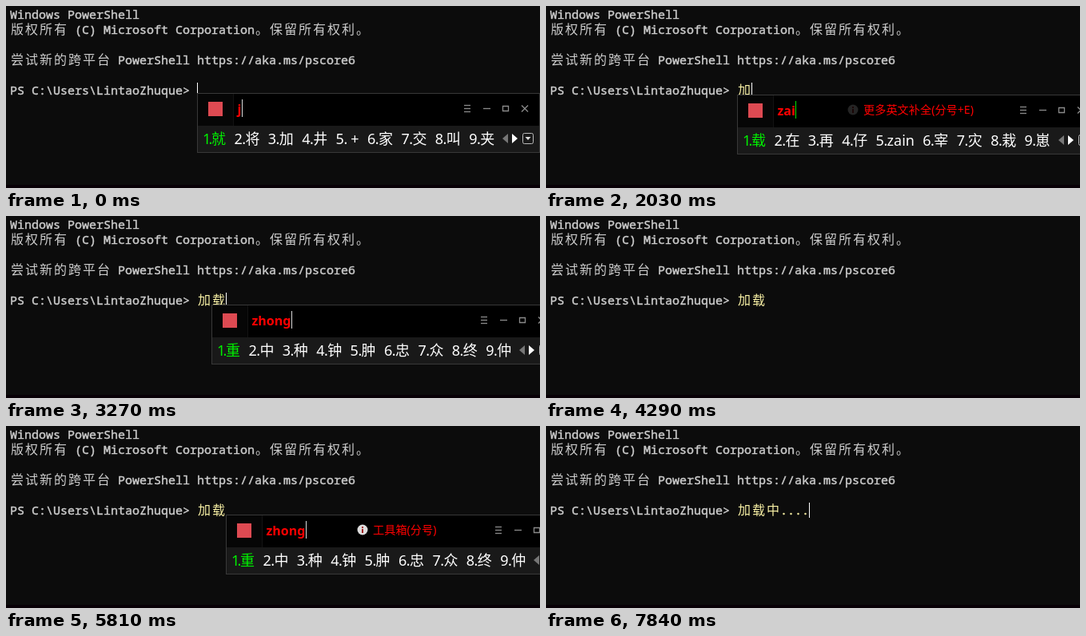
These frames come from a looping animation (668 px wide and 228 px high, 8 s). An HTML page:

```html
<!DOCTYPE html>
<html lang="zh-CN">
<head>
<meta charset="utf-8">
<title>Terminal input</title>
<style>
  html, body { margin: 0; width: 100%; height: 100%; overflow: hidden; background: #0c0c0c; }
  svg { display: block; width: 668px; height: 228px; }
  text { white-space: pre; }
  .mono { font: 15px "Noto Sans Mono", "DejaVu Sans Mono", monospace; stroke-width: 0.45px; }
  .wide { font: 16px "Noto Sans CJK SC", "Noto Sans CJK", sans-serif; letter-spacing: 2px; stroke-width: 0; }
  .out { fill: #ccc; stroke: #ccc; }
  .in { fill: #f9f1a5; stroke: #f9f1a5; }
  .item { font: 18px "Noto Sans", "Noto Sans CJK SC", "Noto Sans CJK", sans-serif; fill: #fff; }
  .pick { fill: #00f000; }
  .keys { font: bold 16px "Noto Sans", sans-serif; fill: #f00; }
  .hint { font: 14.2px "Noto Sans", "Noto Sans CJK SC", "Noto Sans CJK", sans-serif; fill: #f00; }
</style>
</head>
<body>
<svg id="stage" viewBox="0 0 668 228">
  <rect width="668" height="228" fill="#0c0c0c"/>
  <rect y="224" width="668" height="4" fill="#080006"/>
  <g id="screen"></g>
  <g id="live"></g>
</svg>
<script>
const LOOP = 8000, CELL = 9, PROMPT_X = 239;
const screenLayer = document.getElementById('screen');
const live = document.getElementById('live');

function add(parent, tag, attrs, content) {
  const el = document.createElementNS('http://www.w3.org/2000/svg', tag);
  for (const key in attrs) el.setAttribute(key, attrs[key]);
  if (content !== undefined) el.textContent = content;
  parent.appendChild(el);
  return el;
}

const rect = (g, x, y, width, height, fill) => add(g, 'rect', { x, y, width, height, fill });
const line = (g, d, stroke) => add(g, 'path', { d, stroke, fill: 'none', 'stroke-width': 1.3 });
const shape = (g, d, fill) => add(g, 'path', { d, fill });

// Lays text on the terminal grid (Chinese takes two cells); returns the end x.
function cells(g, text, x, y, cls) {
  for (const run of text.match(/[\u3000-\u9fff]+|[^\u3000-\u9fff]+/g) || []) {
    const wide = run.charCodeAt(0) >= 0x3000;
    add(g, 'text', { x: x + (wide ? 1 : 0), y, class: (wide ? 'wide ' : 'mono ') + cls }, run);
    x += run.length * CELL * (wide ? 2 : 1);
  }
  return x;
}

const words = {
  j: '就 将 加 井 + 家 交 叫 夹',
  ji: '几 及 级 记 机 即 急 极 击',
  jia: '加 家 价 假 架 甲 佳 夹 嫁',
  z: '在 中 这 再 怎么 总 最 做 着',
  za: '咋 杂 砸 在 再 扎 匝 咱 脏',
  zai: '载 在 再 仔 zain 宰 灾 栽 崽',
  zh: '中 之后 这 张 纸 账户 找 账号 着',
  zho: '中 周 重 种 州 粥 洲 轴 皱',
  zhon: '中 重 种 钟 肿 忠 众 终 仲',
  zhong: '重 中 种 钟 肿 忠 众 终 仲'
};

function candidates(g, keys, x, y) {
  let end = x;
  words[keys].split(' ').forEach((word, i) => {
    const cls = i ? 'item' : 'item pick';
    add(g, 'text', { x: i ? x : x - 1, y, class: cls, 'letter-spacing': i ? -0.5 : -2.8 }, i + 1 + '.');
    const wordX = x + (i ? 14 : 10);
    const label = add(g, 'text', { x: wordX, y, class: cls }, word === '+' ? ' +' : word);
    end = wordX + label.getComputedTextLength();
    x = end + 10.4;
  });
  return end;
}

function windowIcons(g, right, y) {
  const m = Math.round(right - 91), c = y + 19.5, gray = '#8a8a8a';
  for (const dy of [-4, 0, 4]) line(g, `M${m - 4} ${c + dy}h8`, gray);
  line(g, `M${m + 20} ${c}h9`, gray);
  line(g, `M${m + 44.5} ${c - 3}h7v6h-7z`, gray);
  line(g, `M${m + 68} ${c - 4}l8 8m0 -8l-8 8`, gray);
}

function pager(g, end, y) {
  const x = Math.round(end), c = y + 57;
  shape(g, `M${x + 17} ${c - 6}v12l-7 -6z`, '#777');
  shape(g, `M${x + 22} ${c - 6}v12l7 -6z`, '#fff');
  add(g, 'rect', { x: x + 35.5, y: c - 6.5, width: 13, height: 13, rx: 2, fill: 'none', stroke: '#bbb' });
  shape(g, `M${x + 38.5} ${c - 2}h7l-3.5 4z`, '#ddd');
}

function hintLabel(g, { x, text, glow }, y) {
  const icon = add(g, 'g', { opacity: glow });
  add(icon, 'circle', { cx: x, cy: y + 19, r: 6.5, fill: '#ddd' });
  rect(icon, x - 1, y + 15, 2, 2, '#a02020');
  rect(icon, x - 1, y + 18, 2, 5, '#a02020');
  add(g, 'text', { x: x + 13, y: y + 24, class: 'hint' }, text);
}

function popup({ x, y = 111, keys, opacity = 1, hint, caret = '#d8d8d8' }) {
  const g = add(live, 'g', { opacity });
  const frame = rect(g, x, y, 0, 75, '#383838');
  const head = rect(g, x + 1, y + 1, 0, 40, '#000');
  const row = rect(g, x + 1, y + 41, 0, 33, '#191919');
  const end = candidates(g, keys, x + 8, y + 64);
  const width = Math.round(end + 57 - x);
  frame.setAttribute('width', width);
  head.setAttribute('width', width - 2);
  row.setAttribute('width', width - 2);

  rect(g, x + 1, y + 1, 44, 40, '#060606');
  rect(g, x + 45, y + 1, 1, 40, '#131313');
  rect(g, x + 14, y + 11, 18, 18, '#de4a52');
  const typed = add(g, 'text', { x: x + 50.5, y: y + 26, class: 'keys' }, keys);
  rect(g, Math.round(x + 51 + typed.getComputedTextLength()), y + 8, 1, 22, caret);
  if (hint) hintLabel(g, hint, y);
  windowIcons(g, x + width, y);
  pager(g, end, y);
}

const first = (keys, opacity) => ({ x: 239, y: 109, keys, opacity });
const second = (keys, more) => ({ x: 239, keys, ...more });
const third = (keys, opacity) => ({ x: 257, keys, opacity });
const fourth = (keys, more) => ({ x: 275, keys, ...more });
const english = { x: 384, text: '更多英文补全(分号+E)', glow: 0.16 };
const toolbox = glow => ({ hint: { x: 446, text: '工具箱(分号)', glow } });

// Start time, entered text, popup, caret hidden
const steps = [
  [0, '', first('j')],
  [60, '', first('ji')],
  [180, '', first('jia')],
  [550, '加', first('jia', 0.65)],
  [610, '加', first('jia', 0.3)],
  [670, '加'],
  [1300, '加', null, true],
  [1510, '加', second('z')],
  [1570, '加', second('za')],
  [1630, '加', second('zai')],
  [2030, '加', second('zai', { hint: english, caret: '#00e000' })],
  [2120, '加载', second('zai', { opacity: 0.5 })],
  [2210, '加载'],
  [2670, '加载', third('z')],
  [2820, '加载', third('zh')],
  [2880, '加载', third('zho')],
  [3090, '加载', third('zhon')],
  [3270, '加载', third('zhong')],
  [3610, '加载重', third('zhong', 0.5)],
  [3700, '加载重'],
  [4290, '加载', null, true],
  [4350, '加载'],
  [4650, '加载', fourth('z')],
  [4770, '加载', fourth('zh')],
  [4830, '加载', fourth('zho')],
  [4980, '加载', fourth('zhon')],
  [5220, '加载', fourth('zhong')],
  [5600, '加载', fourth('zhong', toolbox(0.3)), true],
  [5690, '加载', fourth('zhong', toolbox(0.65)), true],
  [5810, '加载', fourth('zhong', toolbox(1)), true],
  [5870, '加载中', fourth('zhong', { opacity: 0.65 })],
  [5930, '加载中', fourth('zhong', { opacity: 0.3 })],
  [5990, '加载中'],
  [6790, '加载中.'],
  [6970, '加载中..'],
  [7230, '加载中...'],
  [7840, '加载中....']
];

function show([, text, box, hidden]) {
  live.replaceChildren();
  const x = cells(live, text, PROMPT_X, 111, 'in');
  if (!hidden) rect(live, x, 96, 1, 19, '#fff');
  if (box) popup(box);
}

[
  [0, 'Windows PowerShell'],
  [1, '版权所有 (C) Microsoft Corporation。保留所有权利。'],
  [3, '尝试新的跨平台 PowerShell https://aka.ms/pscore6'],
  [5, 'PS C:\\Users\\LintaoZhuque> ']
].forEach(([row, text]) => cells(screenLayer, text, 5, 16 + row * 19, 'out'));

const start = performance.now();
let current = null;

function tick() {
  const t = (performance.now() - start) % LOOP;
  const step = steps.findLast(s => s[0] <= t);
  if (step !== current) show(current = step);
  requestAnimationFrame(tick);
}
tick();
</script>
</body>
</html>
```
